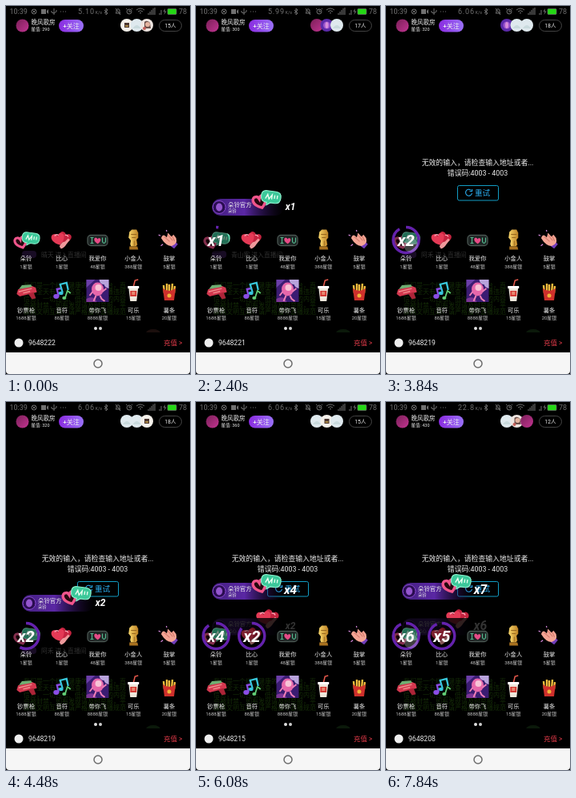
Recreate the animation shown at these times as an HTML page. Size 230 by 460 pixels, loop 8 s.

```html
<!DOCTYPE html>
<html lang="zh-CN">
<head>
<meta charset="utf-8">
<title>Live room gifts</title>
<style>
  html, body { margin: 0; width: 100%; height: 100%; overflow: hidden; background: #000; }
  svg { display: block; width: 100vw; height: 100vh; }
  text { font-family: Roboto, "Noto Sans CJK SC", "Noto Sans CJK", sans-serif; fill: #eee; }
  .mid { text-anchor: middle; }
  .count { font-family: Roboto, sans-serif; font-weight: 700; font-style: italic; text-anchor: middle; fill: #fff; }
  .status text { fill: #707070; }
  .line { fill: none; stroke: #707070; stroke-width: 1; }
</style>
</head>
<body>
<svg viewBox="0 0 230 460">
  <defs>
    <linearGradient id="follow"><stop stop-color="#8a2be0"/><stop offset="1" stop-color="#9a70f8"/></linearGradient>
    <linearGradient id="pill"><stop stop-color="#43207e"/><stop offset=".45" stop-color="#5a27a4"/><stop offset="1" stop-color="#210c42" stop-opacity="0"/></linearGradient>
    <linearGradient id="room" x2="1" y2="1"><stop stop-color="#7b2058"/><stop offset="1" stop-color="#c23491"/></linearGradient>
    <linearGradient id="gold"><stop stop-color="#f8d66a"/><stop offset="1" stop-color="#bd8226"/></linearGradient>
    <path id="heart" d="M0 8C-13 0-9-9-4-8Q-1-8 0-4Q2-8 5-7C11-5 8 3 0 8Z"/>

    <g id="gift0">
      <use href="#heart" transform="translate(-6 3) rotate(-18) scale(.85)" fill="#25080f" stroke="#f0558c" stroke-width="3.6"/>
      <g transform="translate(6 -2) rotate(8)">
        <path d="M-5-7H5Q11-7 11-1Q11 6 5 6H0L-4 9L-4 6H-5Q-11 6-11-1Q-11-7-5-7Z" fill="#3cc89a" stroke="#8ff5d0"/>
        <path d="M-6 2L-4-3L-2 2L1-3L1 2M4-3V1M7-3V1" fill="none" stroke="#e9fff0" stroke-width="1.2"/>
      </g>
    </g>
    <g id="gift1">
      <use href="#heart" transform="translate(4 -2) rotate(16) scale(.92)" fill="#c4233f"/>
      <use href="#heart" transform="translate(-4 -1) rotate(-16) scale(.95)" fill="#e43a56"/>
      <path d="M-3 8Q0 2 4 2L8-2L10 0L6 5Q3 10-1 11Z" fill="#ef9a9c"/>
      <path d="M-9-5Q-7-8-4-6M4-6Q7-7 8-4" fill="none" stroke="#ff9daf" stroke-width="1.4"/>
    </g>
    <g id="gift2">
      <rect x="-12.5" y="-6" width="25" height="13" rx="4" fill="#1c2322" stroke="#4a5652" stroke-width="1.3"/>
      <path d="M-7-3V4M-9-3H-5M-9 4H-5M6-3V2Q8 6 10 2V-3" fill="none" stroke="#56b990" stroke-width="1.2"/>
      <use href="#heart" transform="translate(0 1) scale(.48)" fill="#e54b86"/>
    </g>
    <g id="gift3" fill="url(#gold)">
      <path d="M-5-10L-2-13H4L6-9V-3L3 1H-3L-6-3Z"/>
      <path d="M-3 0H4L5 6L3 8H-3L-4 5Z"/><path d="M-5 8H5L6 12H-5Z" fill="#a8711f"/>
      <path d="M-3-7H4M-2-3H3M1 1V7" stroke="#96651c"/>
    </g>
    <g id="gift4" transform="rotate(-16)">
      <path d="M-1 7L6 3L9 8L3 12Z" fill="#713dba"/>
      <path d="M-9-5Q-5-11-2-4L1-9L4-3L7-5L9 0Q9 8 1 8Q-6 6-9-5Z" fill="#f4a594"/>
      <path d="M-5-6L0 2M0-7L4 2M5-4L6 3" stroke="#d17a6c"/>
      <path d="M-9-8L-11-10M0-11V-13M-9 3L-12 4" stroke="#d98ae0" stroke-width="1.2"/>
    </g>
    <g id="gift5" transform="rotate(-14)">
      <path d="M-12 0L-9-5H9L13-2V4H-9Z" fill="#d4384f"/>
      <path d="M-8-5L-3-9L8-7L9-4Z" fill="#6fae72"/><path d="M2 3H9L10 11H5Z" fill="#ad2438"/>
      <path d="M-9-2H8M-4 1H5" stroke="#f08d8d" stroke-width="1.4"/>
    </g>
    <g id="gift6" fill="none" stroke-width="2.3">
      <path d="M-4 6L-6-3L-1-4" stroke="#8a4ee6"/><ellipse cx="-7" cy="6" rx="3.5" ry="3" fill="#8a4ee6" stroke="none"/>
      <path d="M1 1L-2-9L6-11L8-2" stroke="#38c6dc"/><ellipse cx="-1" cy="2" rx="2.8" ry="2.2" fill="#38c6dc" stroke="none"/>
      <path d="M4 8L7-1L11 2" stroke="#62cf78" stroke-width="1.8"/><ellipse cx="3" cy="8" rx="2.5" ry="2" fill="#62cf78" stroke="none"/>
    </g>
    <g id="gift7">
      <rect x="-14" y="-15" width="28" height="28" fill="#3b1c72"/>
      <path d="M2-15H14V-4Q9-5 8-9Q3-9 2-15Z" fill="#b9a4dc"/><path d="M-14-15H-3L-14-5Z" fill="#6b3fa8"/><path d="M-14 9Q-5 4-1 13H-14Z" fill="#7c3596"/>
      <ellipse cy="-3" rx="7.5" ry="8.5" fill="#e667aa"/><circle cx="1" cy="-5" r="4" fill="#f7c3d6"/>
      <path d="M-6 0L-10 5M6 0L11-4M-2 5L-5 12M3 5L5 9L9 12" fill="none" stroke="#f07fb6" stroke-width="2"/>
    </g>
    <g id="gift8">
      <path d="M0-6L2-14L6-15" fill="none" stroke="#eb5b4e" stroke-width="1.5"/>
      <path d="M-6-5H6L4 12H-4Z" fill="#eee6db"/><path d="M-7-7H7V-4H-7Z" fill="#fff"/>
      <rect x="-4" y="-1" width="8" height="7" fill="#d33833"/><path d="M-2 1H2M-2 3H2" stroke="#f9d7ad"/>
    </g>
    <g id="gift9">
      <path d="M-6 2L-7-8M-3 2L-3-10M0 2V-9M3 2L4-10M6 2L7-7" stroke="#f3bd3d" stroke-width="2.4"/>
      <path d="M-8-4Q0 2 8-4L6 11H-6Z" fill="#cf302c"/><circle cy="5" r="2.5" fill="#f0b43b"/>
    </g>

    <g id="face0"><circle r="8" fill="#f4f0ea"/><path d="M-3-3H3V3H-3Z" fill="#4b3630"/><path d="M-2 1H2" stroke="#c7a34f" stroke-width="1.5"/></g>
    <g id="face1"><circle r="8" fill="#dfe9ee"/><path d="M-5 4Q0-4 5 4" fill="#c9dadd"/></g>
    <g id="face2"><circle r="8" fill="#eee5e0"/><path d="M-3-4Q0-7 4-3L5 4H-3Z" fill="#6b504a"/><circle cx="1" cy="-1" r="3" fill="#e5b5a0"/><circle cx="-3" cy="4" r="2" fill="#c4605a"/></g>
    <circle id="face3" r="8" fill="url(#room)"/>
    <g id="face4"><circle r="8" fill="#5c2baa"/><circle r="4.5" fill="#9a53ce"/><ellipse rx="2" ry="4" fill="#d88edb"/></g>
  </defs>
  <rect width="230" height="460"/>

  <g class="status">
    <text x="4.5" y="10" font-size="9">10:39</text>
    <circle class="line" cx="35" cy="7" r="3"/><path class="line" d="M33.5 5.5L36.5 8.5M36.5 5.5L33.5 8.5"/>
    <path d="M44 4H50V10H44ZM51 6L53 4V10L51 8Z" fill="#707070"/>
    <path class="line" d="M60 3V11M57 6V8L60 9L63 7V5"/>
    <path class="line" d="M68 7H69M71 7H72M74 7H75"/>
    <text id="speed" x="90" y="10" font-size="9" letter-spacing=".8"></text><text x="111.5" y="9.5" font-size="5.5">K/s</text>
    <path class="line" d="M123 5L127 9L125 11V3L127 5L123 9M137 9H143L142 8V5Q140 2 138 5V8ZM137 3L143 11"/>
    <circle class="line" cx="154" cy="7" r="3"/><path class="line" d="M154 5V7H156M151 3L150 4M157 3L158 4"/>
    <path class="line" d="M163 5Q168 1 173 5M165 7Q168 4.5 171 7M167 9Q168 8 169 9"/>
    <path class="line" d="M178 11V9M180 11V7M182 11V5M184 11V3M186 11V2M192 11V9M194 11V5"/>
    <path d="M199 3L196.5 7H198.5L197.5 11L200.5 6.5H198.5Z" fill="#707070"/>
    <rect x="202" y="3.5" width="11" height="7" rx="1" fill="#24d914" stroke="#707070" stroke-width=".7"/>
    <text x="216" y="10" font-size="9">78</text>
  </g>

  <circle cx="20.5" cy="24.5" r="8" fill="url(#room)"/>
  <text x="31.5" y="23" font-size="7.5">晚风歌房</text>
  <text id="score" x="31.5" y="30.5" font-size="5.5"></text>
  <rect x="66" y="17" width="31" height="15.5" rx="7.75" fill="url(#follow)"/>
  <text class="mid" x="81.5" y="27.5" font-size="8" font-weight="500">+关注</text>
  <g id="faces"></g>
  <rect x="191.5" y="17.5" width="28" height="14" rx="7" fill="none" stroke="#555" stroke-width=".8"/>
  <text id="people" class="mid" x="205.5" y="27" font-size="6.5"></text>

  <g id="error">
    <text class="mid" x="114.5" y="199" font-size="8.85">无效的输入，请检查输入地址或者...</text>
    <text class="mid" x="114.5" y="212" font-size="8.85">错误码:4003 - 4003</text>
    <rect x="89.5" y="224.5" width="51" height="18.5" rx="2" fill="none" stroke="#129cc4"/>
    <path d="M106 230A4 4 0 1 0 107.5 234M107.5 229V231.5H104.5" fill="none" stroke="#2aaef0" stroke-width="1.1"/>
    <text x="111" y="237" font-size="9.6" style="fill:#2aaef0">重试</text>
  </g>

  <g id="chat">
    <g id="entry"><rect x="20" y="306" width="18" height="9" rx="4" fill="#7a3ab4"/><text id="entryText" x="44" y="314" font-size="7.8"></text></g>
    <g id="notice" font-size="8"></g>
    <ellipse id="bubble" cx="184" cy="409" rx="9" ry="5"/>
  </g>
  <g id="banners"></g>
  <rect y="270" width="230" height="163" fill="#000" opacity=".8"/>
  <g id="gifts"></g>
  <circle id="touch" cx="31" cy="299" r="9" fill="#fff"/>
  <circle cx="112" cy="403" r="2" fill="#ddd"/><circle cx="118" cy="403" r="2" fill="#ccc"/>

  <rect y="408" width="230" height="25"/>
  <circle cx="16" cy="421" r="5.5" fill="#eee"/>
  <text id="balance" x="28" y="424" font-size="8.6"></text>
  <text x="197" y="424" font-size="8.5" style="fill:#e23b49">充值 &gt;</text>
  <path d="M0 433H230V456Q230 460 226 460H4Q0 460 0 456Z" fill="#f6f6f6"/>
  <circle cx="115" cy="447" r="5" fill="none" stroke="#6c6c6c" stroke-width="1.5"/>
</svg>

<script>
const LOOP = 8000, FRAME = 160, COUNTDOWN = 1900;
const $ = id => document.getElementById(id);
const clamp = v => Math.max(0, Math.min(1, v));
const ramp = (t, start, length) => clamp((t - start) / length);
const tapsBefore = (taps, t) => taps.filter(at => at <= t);
const stepAt = (steps, t) => steps.filter(([at]) => at <= t).pop()[1];
const show = (node, opacity) => node.setAttribute('opacity', opacity);
const move = (node, x, y, scale = 1) =>
  node.setAttribute('transform', `translate(${x} ${y}) scale(${scale})`);

const gifts = [
  ['朵铃', 1], ['比心', 1], ['我爱你', 48], ['小金人', 388], ['鼓掌', 5],
  ['钞票枪', 1688], ['音符', 88], ['带你飞', 8888], ['可乐', 15], ['薯条', 20]
];
const speeds = [[0, '5.10'], [1600, '5.99'], [3200, '6.06'], [6880, '20.3'], [7520, '22.8']];
const viewers = [[0, 15], [640, 16], [1920, 17], [3200, 18], [4800, 15], [6400, 12]];
const visitors = [[0, '晴天'], [640, '小雨'], [1920, '青山客'], [3200, '阿禾'], [4800, '小满'], [6400, '云边']];
const firstTaps = [560];
const heartTaps = [5200, 5800, 6250, 6760, 7200, 7720];
const comboTaps = [3360, 3680, 5400, 5900, 6400, 7000, 7720];
const allTaps = [...firstTaps, ...comboTaps, ...heartTaps];
const faceOrder = [0, 1, 2, 3, 4, 1, 1];

$('gifts').innerHTML = gifts.map(([name, price], i) => {
  const x = 25 + i % 5 * 44.75, y = i < 5 ? 292.5 : 357;
  return `<g transform="translate(${x} ${y})"><use href="#gift${i}"/>
    <text class="mid" y="25.8" font-size="7.3">${name}</text>
    <text class="mid" y="35" font-size="6" style="fill:#c4c4c4">${price}星银</text>
    ${i < 2 ? `<g id="combo${i}"><circle r="16" fill="#000" opacity=".45"/>
      <circle id="ring${i}" r="16" fill="none" stroke="#6422ad" stroke-width="3.5" pathLength="100" transform="rotate(-90)"/>
      <text id="combo${i}Text" class="count" y="7" font-size="20"></text></g>` : ''}</g>`;
}).join('');

$('banners').innerHTML = [0, 1].map(i => `<g id="banner${i}">
  <rect x="20" y="-10.5" width="90" height="21" rx="10.5" fill="url(#pill)"/>
  <circle cx="29" r="8" fill="#2a0d52" stroke="#8a4bd0"/><ellipse cx="29" rx="4" ry="5" fill="#9456ce"/>
  <text x="40" y="-.8" font-size="7.4">朵铃官方</text><text x="40" y="6.5" font-size="5.3">${gifts[i][0]}</text>
  <use href="#gift${i}" transform="translate(${87 + i * 3} -10) scale(1.12)"/>
  <g id="pulse${i}"><text id="banner${i}Text" class="count" y="3" font-size="12"></text></g></g>`).join('');

$('notice').innerHTML = [
  '我们是一个绿色健康的直播平台，直', '内容全天有专人巡查，请勿传播违规',
  '信息，一切违法、低俗和不良的内容', '会被封禁，如有发现请及时举报，平',
  '提倡文明互动，请严格遵守直播规范'
].map((line, i) => `<text x="22" y="${352 + i * 8.3}" style="fill:#5fd822">${line}</text>`).join('');

$('faces').innerHTML = faceOrder.map((face, i) => `<use id="viewer${i}" href="#face${face}"/>`).join('');

function drawFaces(t) {
  const clock = (t + 700) / 1000 + .17;
  const shift = Math.floor(clock) - 1 + ramp(clock % 1, 0, .25);
  faceOrder.forEach((_, i) => {
    const slot = (((i - shift) % 7) + 7) % 7;
    const leaving = slot > 6;
    const node = $('viewer' + i);
    show(node, leaving ? slot - 6 : clamp((3 - slot) * 2));
    move(node, 151 + (leaving ? -.1 : slot) * 12.5, 24);
    node.dataset.slot = leaving ? -1 : slot;
  });
  $('faces').append(...[...$('faces').children].sort((a, b) => a.dataset.slot - b.dataset.slot));
}

function drawCombo(i, taps, t) {
  const last = tapsBefore(taps, t).pop();
  const age = last === undefined ? Infinity : t - last;
  show($('combo' + i), age < COUNTDOWN + 200 ? 1 : 0);
  const left = clamp(1 - age / COUNTDOWN);
  $('ring' + i).setAttribute('stroke-dasharray', `${left * 100} 100`);
  show($('ring' + i), left ? 1 : 0);
  const count = tapsBefore(taps, t - 150).length;
  $(`combo${i}Text`).textContent = count ? 'x' + count : '';
}

function drawBanner(i, taps, t, enter, leave, y) {
  const gone = ramp(t, leave, 320), hit = tapsBefore(taps, t);
  show($('banner' + i), t < enter ? 0 : 1 - gone);
  move($('banner' + i), -130 * (1 - ramp(t, enter, 480)), y - 15 * gone);
  $(`banner${i}Text`).textContent = 'x' + hit.length;
  const age = t - (hit.at(-1) ?? 0);
  move($('pulse' + i), 118, 0, hit.length > 2 ? 1.15 + .25 * (1 - ramp(age, 0, 320)) : 1);
}

function draw(t) {
  $('speed').textContent = stepAt(speeds, t);
  $('people').textContent = stepAt(viewers, t) + '人';
  $('score').textContent = '星值: ' + (290 + 10 * tapsBefore(allTaps, t - 100).length);
  $('balance').textContent = 9648222 - tapsBefore(allTaps, t).length;
  show($('error'), t >= 3040 ? 1 : 0);

  const arrival = visitors.filter(([at]) => at <= t).pop();
  $('entryText').textContent = arrival[1] + ' 进入直播间';
  move($('entry'), arrival[0] ? 40 * (1 - ramp(t, arrival[0], 480)) : 0, 0);
  show($('entry'), t < 5600 ? 1 : 0);
  $('bubble').setAttribute('fill', t < 1600 ? '#8a4a42' : '#357b30');

  drawFaces(t);
  const second = t >= 3360;
  const taps = second ? comboTaps : firstTaps;
  drawCombo(0, taps, t);
  drawCombo(1, heartTaps, t);
  show($('touch'), comboTaps.some(at => Math.abs(at - t) <= 160) ? .25 : 0);
  drawBanner(0, taps, t, second ? 3950 : 1024, second ? LOOP : 3000, 251.5 - 15 * ramp(t, 5560, 320));
  drawBanner(1, heartTaps, t, 5600, LOOP, 281);
}

function tick() {
  const t = performance.now() % LOOP;
  draw(Math.floor(t / FRAME) * FRAME);
  requestAnimationFrame(tick);
}
tick();
</script>
</body>
</html>
```
